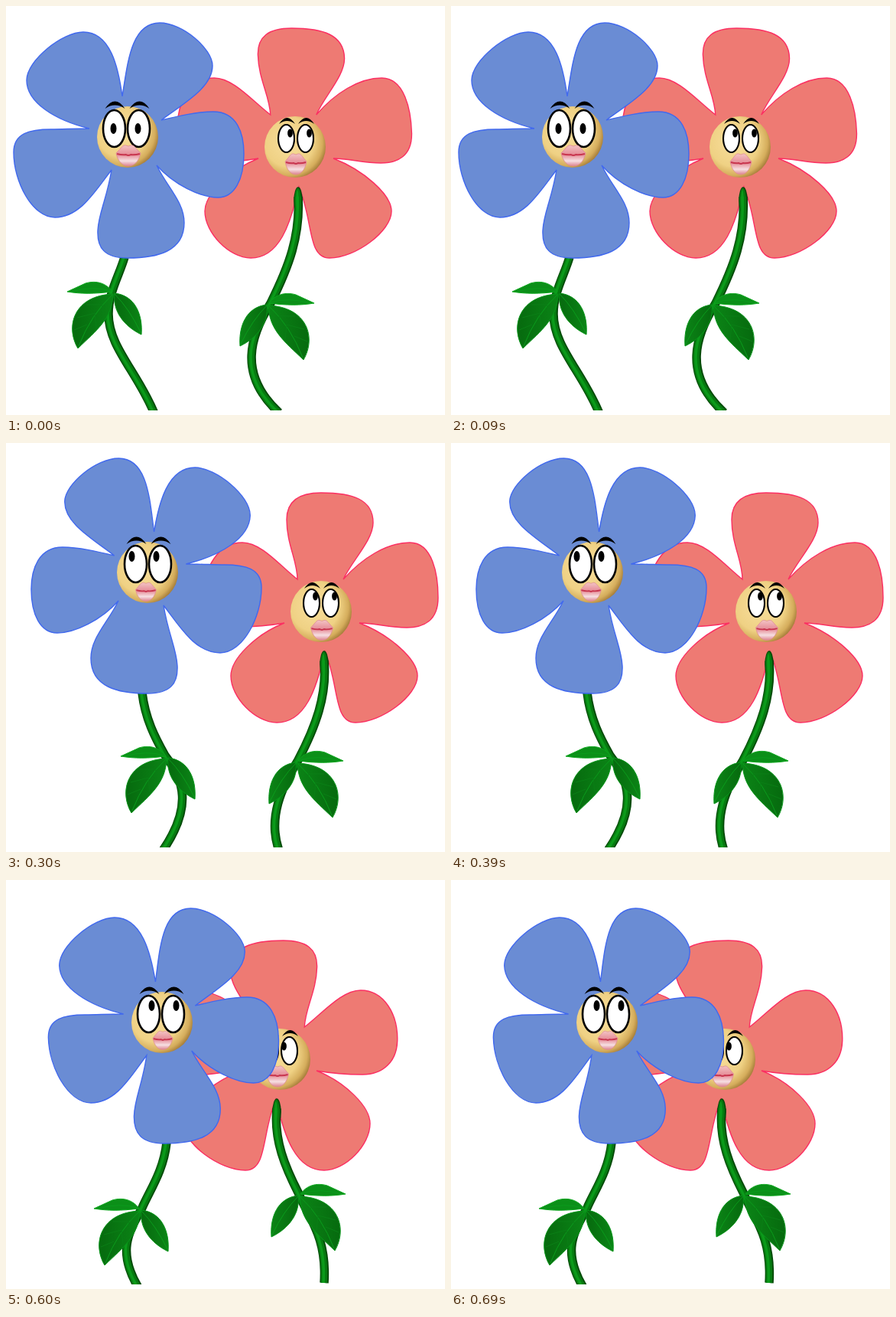
Write an HTML page that moves like this. It is 574x534 px and loops after 0.75 s.

```html
<!DOCTYPE html>
<html lang="en">
<head>
<meta charset="utf-8">
<title>Two dancing flowers</title>
<style>
  html, body { margin: 0; width: 100%; height: 100%; overflow: hidden; background: #fff; }
  svg { display: block; }
</style>
</head>
<body>
<svg id="stage" width="574" height="528">
  <defs>
    <radialGradient id="skin" cx=".4" cy=".42" r=".62">
      <stop offset="0" stop-color="#f8de9c"/>
      <stop offset=".65" stop-color="#efd184"/>
      <stop offset=".88" stop-color="#d5ad5c"/>
      <stop offset="1" stop-color="#a9803c"/>
    </radialGradient>
    <linearGradient id="lip" x2="0" y2="1">
      <stop offset="0" stop-color="#f3c3c4"/>
      <stop offset=".45" stop-color="#e58b96"/>
      <stop offset=".75" stop-color="#f6dfe2"/>
      <stop offset="1" stop-color="#dd8290"/>
    </linearGradient>
    <linearGradient id="leafFill">
      <stop offset="0" stop-color="#0b8416"/>
      <stop offset="1" stop-color="#066a0e"/>
    </linearGradient>
    <g id="leaves" stroke="#08961a" stroke-width="1" fill="url(#leafFill)">
      <path d="M-3 2C-30 5-40 30-38 56C-15 45 0 25-3 2Z"/>
      <path d="M-1 3C0 35 20 50 45 74C62 45 50 5-1 3Z"/>
      <path d="M0 0C10-14 25-14 35-11L59 0C40 3 25 3 0 0Z" fill="#0b8f18" stroke="#0ca71d"/>
      <path d="M-3 3Q-22 22-37 53M0 4Q28 30 44 71M2-1Q25-8 54 0" fill="none" stroke="#0a9c1c"/>
      <path d="M14 17L34 17M23 28L46 34M33 43L50 50M14 17L10 34M23 28L21 47" fill="none" stroke="#0a7f16"/>
    </g>
  </defs>
  <g id="scene"></g>
</svg>
<script>
const HOLD = 150;

// Outlines run clockwise from one notch to the next, around the face centre.
const blue = {
  fill: '#6a8cd4', line: '#4169ee', spread: 16, eye: [14.5, 24], pupil: [4, 7], brow: 13, browY: -42, leafSide: -1,
  start: '-50 -11',
  petals: [
    '-95 -22 -132 -45 -132 -74 -132 -100 -85 -137 -58 -137 -22 -137 -12 -90 -7 -53',
    '0 -95 4 -149 42 -149 72 -149 111 -115 111 -93 111 -65 75 -45 44 -22',
    '65 -27 90 -33 112 -33 143 -33 152 -5 152 22 152 55 140 79 118 79 95 79 60 62 38 37',
    '52 66 74 85 74 112 74 150 38 158 0 158 -30 158 -40 145 -39 122 -38 100 -27 80 -21 43',
    '-42 70 -62 105 -95 105 -125 105 -149 58 -149 20 -149 -5 -128 -10 -100 -10 -85 -10 -70 -11 -50 -11'
  ],
  poses: [
    { at: [159, 171], side: 1, lean: [0, 0], eyes: -1.5, look: [-1, 0], lips: [1, 24, 32, 28], joint: [139, 373],
      stem: 'M155 328C148 352 134 374 134 402C134 445 172 478 194 532' },
    { at: [186, 182], side: -1, lean: [-13, -2], eyes: -3, look: [-8, -10], lips: [2, 25, 26, 26], joint: [164, 389],
      stem: 'M186 340C184 365 165 385 152 410C130 445 132 485 155 532' },
    { at: [185, 169], side: -1, lean: [3, 0], eyes: .5, look: [-5, -10], lips: [-2, 25, 27, 25], joint: [209, 409],
      stem: 'M178 326C182 360 195 385 208 408C233 440 244 475 205 532' },
    { at: [160, 207], side: -1, lean: [0, 16], eyes: -2, look: [-5, -9], lips: [3, 24, 30, 26], joint: [152, 419],
      stem: 'M165 365C160 395 152 410 150 435C143 460 144 490 151 525' },
    { at: [204, 186], side: 1, lean: [-3, 2], eyes: -1.5, look: [4, -11], lips: [1, 23, 26, 25], joint: [174, 429],
      stem: 'M210 343C206 380 188 405 178 428C160 460 145 485 173 532' }
  ]
};

const red = {
  fill: '#ee7a73', line: '#fb2f62', spread: 12.5, eye: [10.5, 18], pupil: [3.4, 5.5], brow: 10.5, browY: -35, leafSide: 1,
  start: '-31 -42',
  petals: [
    '-31 -66 -45 -88 -45 -120 -45 -144 -30 -155 0 -155 42 -155 68 -146 68 -116 68 -93 40 -66 29 -42',
    '54 -70 86 -90 116 -90 146 -90 153 -48 153 -18 153 12 134 21 112 21 89 21 69 15 50 15',
    '89 30 126 62 126 84 126 110 79 145 45 145 16 145 24 97 5 52',
    '-6 102 -21 145 -58 145 -86 145 -118 112 -118 84 -118 62 -86 30 -48 15',
    '-71 19 -91 20 -108 20 -136 20 -153 2 -153 -24 -153 -58 -134 -90 -103 -90 -78 -90 -54 -60 -31 -42'
  ],
  poses: [
    { at: [378, 184], side: 1, lean: [-3, 0], eyes: 1, look: [5, -7], lips: [1, 22, 28, 28], joint: [344, 388], tip: [382, 236],
      stem: 'M382 249C385 300 370 340 346 388C320 430 302 480 357 531' },
    { at: [390, 236], side: 1, lean: [-15, 0], eyes: -1, look: [4, -9], lips: [2, 23, 26, 37], joint: [376, 408], tip: [393, 287],
      stem: 'M393 300C394 340 388 380 373 410C360 440 304 475 331 532' },
    { at: [412, 220], side: 1, lean: [0, 0], eyes: 0, look: [5, -9], lips: [1, 24, 29, 27], joint: [382, 415], tip: [416, 271],
      stem: 'M416 284C420 330 405 370 382 414C360 450 342 490 357 532' },
    { at: [350, 165], side: -1, lean: [3, 0], eyes: -.5, look: [-5, -7], lips: [-2, 21, 30, 32], joint: [403, 403], tip: [346, 216],
      stem: 'M346 229C342 290 380 340 402 402C412 450 408 482 352 531' },
    { at: [358, 234], side: -1, lean: [3, 0], eyes: 0, look: [-7, -6], lips: [-3, 22, 29, 28], joint: [385, 410], tip: [354, 285],
      stem: 'M354 298C350 340 365 375 383 410C395 440 420 465 416 526' }
  ]
};

// Mirrors the outline and shears its upper and lower halves separately.
function outline({ start, petals }, { side, lean }) {
  const bend = text => {
    const n = text.split(' ').map(Number);
    return n.map((v, i) => i % 2 ? v : v * side + lean[+(n[i + 1] > 0)] * Math.abs(n[i + 1]) / 100).join(' ');
  };
  return `M${bend(start)}${petals.map(p => 'C' + bend(p)).join('')}Z`;
}

const ellipse = (x, y, rx, ry, more) => `<ellipse cx="${x}" cy="${y}" rx="${rx}" ry="${ry}" ${more}/>`;

function face(f, { eyes, look, lips: [x, y, w, h] }) {
  const sides = [eyes - f.spread, eyes + f.spread];
  const brow = f.brow, thick = brow / 3.4;
  return `<circle r="40" fill="url(#skin)"/>` +
    sides.map(e =>
      ellipse(e, -11, ...f.eye, `fill="#fff" stroke="#000" stroke-width="${brow / 5}"`) +
      ellipse(e + look[0], -11 + look[1], ...f.pupil, '') +
      `<path transform="translate(${e + 1} ${f.browY})" d="M${-brow} 5Q0 ${-thick * 3.6} ${brow} 5Q0 ${-thick} ${-brow} 5Z"/>`
    ).join('') +
    `<g transform="translate(${x} ${y}) scale(${w / 30} ${h / 28})">
      <path d="M-15-3C-9-9-7-14-3-13Q0-11 3-13C7-14 9-9 15-3C13 8 7 14 0 14C-7 14-13 8-15-3Z" fill="url(#lip)" stroke="#e08a94" stroke-width=".8"/>
      <path d="M-14-2Q-7 0-3-1Q0 1 3-1Q7 0 14-2" fill="none" stroke="#c8364f" stroke-width="2"/>
    </g>`;
}

function stem({ stem: d, tip }) {
  const layer = (color, width, dx) =>
    `<g transform="translate(${dx})"><path d="${d}" fill="none" stroke="${color}" stroke-width="${width}"/>` +
    (tip ? ellipse(tip[0], tip[1] + 18, width / 2, 12 + width / 2, `fill="${color}"`) : '') + '</g>';
  return layer('#034a08', 11.5, 0) + layer('#067a10', 8.5, -.4) + layer('#0b9a1a', 3.5, -1);
}

function flower(f, i) {
  const p = f.poses[i];
  const head = `<g transform="translate(${p.at})">
    <path d="${outline(f, p)}" fill="${f.fill}" stroke="${f.line}" stroke-width="1.4"/>${face(f, p)}</g>`;
  const stalk = stem(p) + `<use href="#leaves" transform="translate(${p.joint}) scale(${f.leafSide} 1)"/>`;
  return p.tip ? head + stalk : stalk + head;
}

const redInFront = [false, true, false, true, false];
const scenes = redInFront.map((front, i) => (front ? [blue, red] : [red, blue]).map(f => flower(f, i)).join(''));
const scene = document.getElementById('scene');
let shown = -1;

function draw(now) {
  const i = Math.floor(now / HOLD) % scenes.length;
  if (i !== shown) scene.innerHTML = scenes[shown = i];
  requestAnimationFrame(draw);
}
draw(0);
</script>
</body>
</html>
```
